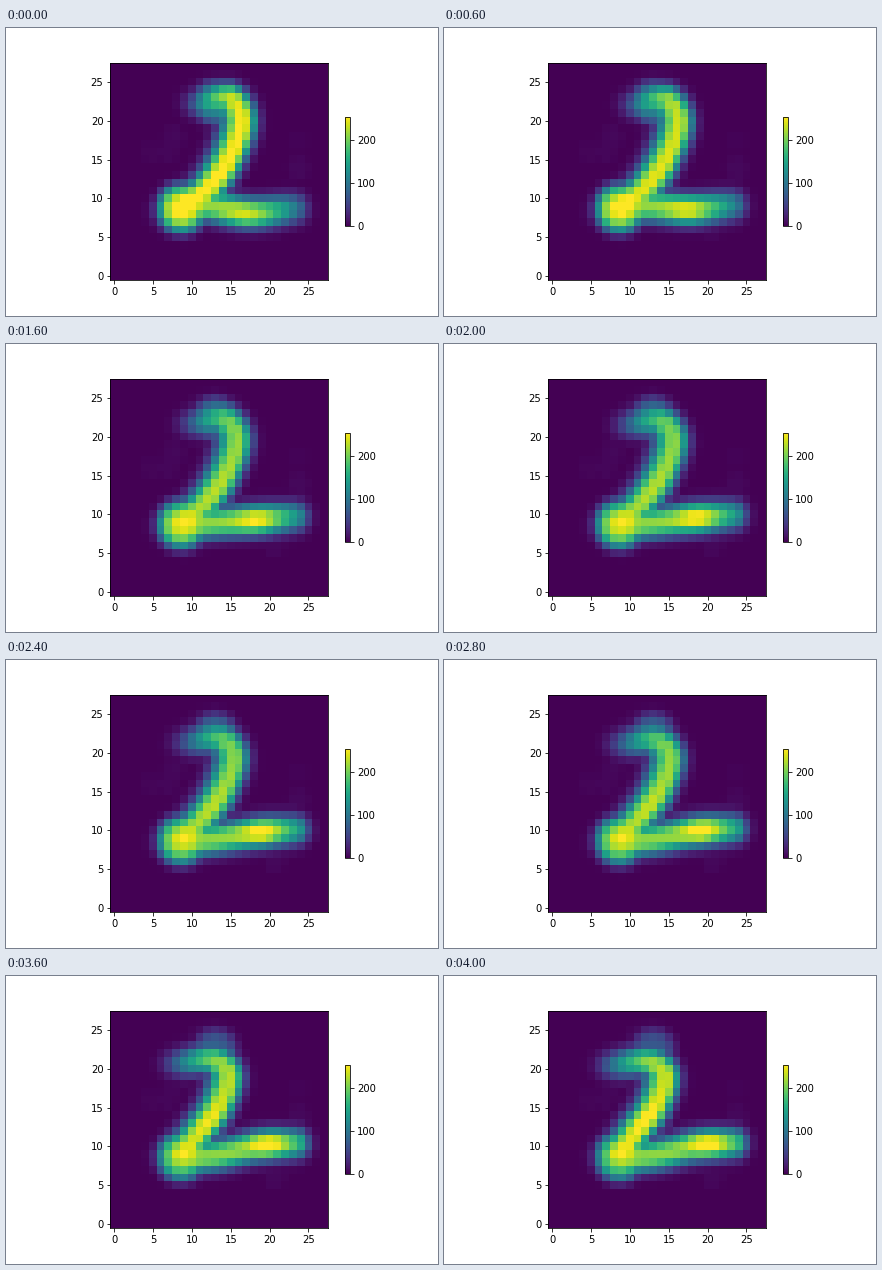
Recreate the animation shown at these times as a matplotlib script. Size 432 by 288 pixels, loop 4.2 s.

```python
import numpy as np
import matplotlib.pyplot as plt
from matplotlib.animation import FuncAnimation

FRAMES, INTERVAL = 21, 200
SIZE, PEAK = 28, 254
SMEAR = 1.4  # strokes are softer on their left side

COLS, ROWS = np.meshgrid(np.arange(SIZE), np.arange(SIZE))
rng = np.random.default_rng(4)
HAZE = rng.uniform((3, 2, 2), (25, 25, 6), (14, 3))


def lerp(a, b, u):
    return np.asarray(a) + (np.asarray(b) - a) * u


def smooth(points, steps=16):
    """Dense Hermite curve through the points."""
    slope = np.gradient(points, axis=0)
    s = np.linspace(0, 1, steps)[:, None]
    a, b = points[:-1, None], points[1:, None]
    curve = ((2 * s**3 - 3 * s**2 + 1) * a + (3 * s**2 - 2 * s**3) * b
             + (s**3 - 2 * s**2 + s) * slope[:-1, None]
             + (s**3 - s**2) * slope[1:, None])
    return curve.reshape(-1, 2)


def bump(s, center, spread=0.15):
    return np.exp(-((s - center) / spread) ** 2)


def brush(points, level, width):
    """Soft stroke; level gives the brightness along its length."""
    curve = smooth(points)
    ink = level(np.linspace(0, 1, len(curve)))[:, None, None]
    x, y = curve.T[:, :, None, None]
    dx = COLS - x
    dx = np.where(dx < 0, dx / SMEAR, dx)
    return (ink * np.exp(-(np.hypot(dx, ROWS - y) / width) ** 2.4)).max(axis=0)


def spot(x, y, level, radius):
    return level * np.exp(-(np.hypot(COLS - x, ROWS - y) / radius) ** 4)


def stem(u, turn):
    points = lerp([(12, 22.2), (14.9, 22.9), (16.5, 20), (15, 15.3), (12.3, 11.4), (9, 9)],
                  [(8.5, 20.4), (12.4, 20.9), (14.6, 19), (13.3, 15), (11.2, 12.2), (9, 9.2)],
                  turn)
    body = 262 - 20 * u - 34 * np.sin(np.pi * u)
    return brush(points, lambda s: body - 150 * np.exp(-s / 0.13)
                 + 20 * u * bump(s, 0.72), 1.8)


def base(u, turn, lift):
    points = lerp([(8.6, 8.3), (12, 9), (17.5, 8.1), (23, 8.7)],
                  [(8.8, 8.6), (13, 8.8), (18.7, 10.1), (23.2, 10.4)], lift)
    return brush(points, lambda s: 212 + lerp(35, 65, lift) * bump(s, 0.64 + 0.14 * turn)
                 - lerp(110, 30, u) * s**6, 1.9)


def digit(frame):
    u = frame / (FRAMES - 1)
    turn = u ** 1.3                 # the hook bends late
    lift = np.sin(np.pi * u / 2)    # the foot rises early
    parts = (stem(u, turn), base(u, turn, lift),
             spot(8.7, 8.7, lerp(235, 195, u), 3.1),
             spot(13, 22.3, lerp(115, 70, u), 2.8))
    ink = sum(part ** 6 for part in parts) ** (1 / 6)
    haze = max_spots = np.max([spot(x, y, level, 1.6) for x, y, level in HAZE], axis=0)
    return np.clip(np.maximum(ink, haze), 0, PEAK)


fig, ax = plt.subplots(figsize=(6, 4), dpi=72, facecolor="white")
fig.subplots_adjust(left=0.125, right=0.9, bottom=0.125, top=0.88)
image = ax.imshow(digit(0), cmap="viridis", vmin=0, vmax=PEAK,
                  origin="lower", interpolation="nearest")
ax.set_xticks(range(0, SIZE, 5))
ax.set_yticks(range(0, SIZE, 5))
fig.colorbar(image, ax=ax, shrink=0.5, ticks=[0, 100, 200])


def update(frame):
    image.set_data(digit(frame))
    return [image]


anim = FuncAnimation(fig, update, frames=FRAMES, interval=INTERVAL,
                     repeat=True, repeat_delay=0, blit=False)
plt.show()
```
